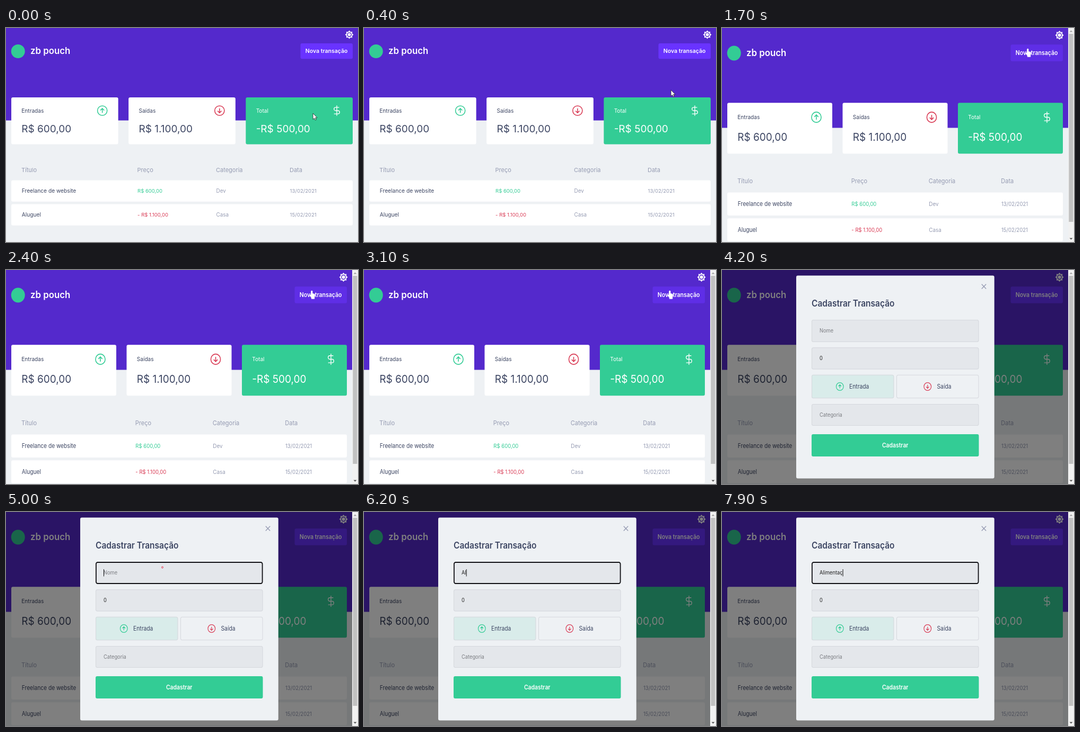
These frames come from a looping animation (664 by 404 pixels, 8 s). An HTML page with a canvas:

```html
<!DOCTYPE html>
<html lang="pt-BR">
<head>
<meta charset="utf-8">
<title>Transações</title>
<style>
html, body { margin: 0; width: 100%; height: 100%; overflow: hidden; background: #eef1f4; }
canvas { display: block; width: 664px; height: 404px; }
</style>
</head>
<body>
<canvas id="stage"></canvas>
<script>
const W = 664, H = 404, LOOP = 8000;
const canvas = document.getElementById('stage');
const ctx = canvas.getContext('2d');
const dpr = window.devicePixelRatio || 1;
canvas.width = W * dpr;
canvas.height = H * dpr;

const PURPLE = '#5429cc', GREEN = '#33cc95', RED = '#d93a54';
const INK = '#3d4663', MUTED = '#969cb3', PAGE = '#eef1f4';
const STRETCH = 1.08; // vertical zoom once the scrollbar is present

const CUT = 1700, OPEN = 3500, CLOSE_ICON = 3600, POINTER_OFF = 4200, FOCUS = 4900;
const KEYS = [[6200, 2], [6400, 3], [6700, 4], [6900, 5], [7000, 6], [7200, 7], [7300, 8], [7900, 9]];
const WORD = 'Alimentaç';

const dollar = new Path2D('M12 1V23M17 5H9.5a3.5 3.5 0 0 0 0 7h5a3.5 3.5 0 0 1 0 7H6');
const arrowCursor = new Path2D('M0 0V11.5L2.6 9.2L4.4 13L6.2 12.2L4.5 8.4H8Z');
const handCursor = new Path2D('M2.4 1C2.4 -.4 4.8 -.4 4.8 1V5.2L8.4 6Q9.8 6.4 9.6 8.2L8.6 12.4V15H3V13L.2 9.4C-.8 8 1 6.8 2 8L2.4 8.4Z');

function rect(x, y, w, h, fill, r = 0) {
  ctx.fillStyle = fill;
  ctx.beginPath();
  ctx.roundRect(x, y, w, h, r);
  ctx.fill();
}

// y is the middle of the capitals
function text(str, x, y, size, color, weight = 400, align = 'left') {
  ctx.font = `${weight} ${size}px Inter, "Open Sans", sans-serif`;
  ctx.textAlign = align;
  ctx.fillStyle = color;
  ctx.fillText(str, x, y + size * 0.36);
}

function disc(x, y, r, fill) {
  ctx.fillStyle = fill;
  ctx.beginPath();
  ctx.arc(x, y, r, 0, Math.PI * 2);
  ctx.fill();
}

function at(x, y, scale, draw) {
  ctx.save();
  ctx.translate(x, y);
  ctx.scale(scale, scale);
  draw();
  ctx.restore();
}

function arrowIcon(x, y, r, color, dir) {
  at(x, y, r / 9, () => {
    ctx.strokeStyle = color;
    ctx.lineWidth = 1.5;
    ctx.beginPath();
    ctx.arc(0, 0, 8.8, 0, Math.PI * 2);
    ctx.moveTo(0, -4 * dir);
    ctx.lineTo(0, 4 * dir);
    ctx.moveTo(-3.6, 0.5 * dir);
    ctx.lineTo(0, 4 * dir);
    ctx.lineTo(3.6, 0.5 * dir);
    ctx.stroke();
  });
}

function dollarIcon(x, y) {
  at(x, y, 0.88, () => {
    ctx.translate(-12, -12);
    ctx.strokeStyle = '#fff';
    ctx.lineWidth = 1.5;
    ctx.stroke(dollar);
  });
}

function sunIcon(x, y) {
  ctx.fillStyle = '#fff';
  ctx.beginPath();
  for (let i = 0; i < 16; i++) {
    const a = i * Math.PI / 8, r = i % 2 ? 5.8 : 8;
    ctx.lineTo(x + r * Math.cos(a), y + r * Math.sin(a));
  }
  ctx.fill();
  disc(x, y, 4.4, PURPLE);
  disc(x, y, 3, '#fff');
}

function card(x, w, label, value, total) {
  const color = total ? '#fff' : INK;
  rect(x, 130.9, w, 88.7, total ? GREEN : '#fff', 3);
  text(label, x + 19.3, 156, 10.1, color);
  text(value, x + 19.3, 190, 19, color);
}

function page(right, hover) {
  rect(0, 0, W, H, PAGE);
  rect(0, 0, W, 174.5, PURPLE);
  sunIcon(right - 6.4, 12.6);

  disc(22.7, 44, 13, GREEN);
  text('zb pouch', 46, 43.4, 16.8, '#fff', 600);
  rect(right - 98.5, 29, 98.5, 29.2, hover ? '#5f2ee6' : '#6933ff', 3);
  text('Nova transação', right - 49.4, 43.7, 10.5, '#fff', 600, 'center');

  const w = (right - 10 - 39) / 3, step = w + 19.5;
  card(10, w, 'Entradas', 'R$ 600,00');
  card(10 + step, w, 'Saídas', 'R$ 1.100,00');
  card(10 + 2 * step, w, 'Total', '-R$ 500,00', true);
  arrowIcon(10 + w - 30, 156, 9.3, GREEN, -1);
  arrowIcon(10 + step + w - 30, 156, 9.3, RED, 1);
  dollarIcon(right - 30, 156);

  const cols = [0, 218.5, 367, 506].map(c => 29 + c * (right - 10) / 644);
  ['Título', 'Preço', 'Categoria', 'Data'].forEach((s, i) => text(s, cols[i], 267.7, 11, MUTED));
  const rows = [
    ['Freelance de website', 'R$ 600,00', 'Dev', '13/02/2021', GREEN],
    ['Aluguel', '- R$ 1.100,00', 'Casa', '15/02/2021', RED]
  ];
  rows.forEach(([name, price, kind, date, color], i) => {
    const y = 287.6 + i * 45;
    rect(10, y, right - 10, 40.2, '#fff', 3);
    text(name, cols[0] + 0.8, y + 20.2, 10.2, INK);
    text(price, cols[1] + 0.6, y + 20.2, 9.5, color);
    text(kind, cols[2] + 0.6, y + 20.2, 9.9, MUTED);
    text(date, cols[3] + 0.6, y + 20.2, 9.6, MUTED);
  });
}

function box(x, y, w, h, fill, stroke = '#d5d8dd', line = 1) {
  rect(x, y, w, h, fill, 3);
  ctx.strokeStyle = stroke;
  ctx.lineWidth = line;
  ctx.beginPath();
  ctx.roundRect(x + line / 2, y + line / 2, w - line, h - line, 3);
  ctx.stroke();
}

function nameField(t) {
  const focused = t >= FOCUS;
  box(169, 87, 315.5, 38.9, '#e4e7eb', focused ? '#101014' : undefined, focused ? 1.8 : 1);
  let typed = '', last = FOCUS;
  for (const [time, n] of KEYS) {
    if (t >= time) {
      typed = WORD.slice(0, n);
      last = time;
    }
  }
  text(typed || 'Nome', 184, 106, 9.3, typed ? '#222' : '#7b7d82');
  if (focused && (t - last) % 1000 < 500) {
    const x = 184 + (typed ? ctx.measureText(typed).width : 0);
    rect(x, 100, 1, 12.6, '#111');
  }
}

function modal(t) {
  rect(140, 9.7, 373.7, 354.6, PAGE, 3);
  if (t >= CLOSE_ICON) {
    ctx.strokeStyle = MUTED;
    ctx.lineWidth = 1.4;
    ctx.beginPath();
    ctx.moveTo(489.8, 24.7);
    ctx.lineTo(498.2, 32.9);
    ctx.moveTo(498.2, 24.7);
    ctx.lineTo(489.8, 32.9);
    ctx.stroke();
  }
  text('Cadastrar Transação', 169, 58, 15.5, INK, 600);
  nameField(t);
  box(169, 135.4, 315.5, 38.2, '#e4e7eb');
  text('0', 184, 154.4, 9.3, '#222');

  box(169, 183, 155.3, 41.4, '#d9ecea');
  box(329, 183, 155.5, 41.4, PAGE);
  arrowIcon(222.3, 203.7, 7, GREEN, -1);
  arrowIcon(387.8, 203.7, 7, RED, 1);
  text('Entrada', 240, 203.7, 10.3, INK);
  text('Saída', 405.5, 203.7, 10.3, INK);

  box(169, 234.2, 315.5, 38, '#e4e7eb');
  text('Categoria', 184, 253.3, 9.3, '#7b7d82');
  rect(169, 287, 315.5, 38.9, GREEN, 3);
  text('Cadastrar', 326.7, 306.3, 10.4, '#fff', 600, 'center');
}

function triangle(x, y, dir, color) {
  ctx.fillStyle = color;
  ctx.beginPath();
  ctx.moveTo(x - 3, y - 1.5 * dir);
  ctx.lineTo(x + 3, y - 1.5 * dir);
  ctx.lineTo(x, y + 1.5 * dir);
  ctx.fill();
}

function scrollbar() {
  rect(653, 0, 11, H, '#f1f1f1');
  rect(654.3, 11, 8.2, 355, '#c1c1c1');
  triangle(658.5, 6, -1, '#a0a0a0');
  triangle(658.5, 398, 1, '#505050');
}

function pointer(path, x, y, outline) {
  at(x, y, 1, () => {
    ctx.lineJoin = 'round';
    ctx.lineWidth = 0.8;
    ctx.fillStyle = '#fff';
    ctx.strokeStyle = outline;
    ctx.fill(path);
    ctx.stroke(path);
  });
}

function clickRing(t) {
  if (t < FOCUS || t >= FOCUS + 200) return;
  ctx.strokeStyle = '#e8304a';
  ctx.lineWidth = 1;
  ctx.beginPath();
  ctx.arc(295, 104.5, 1.5, 0, Math.PI * 2);
  ctx.stroke();
}

function render(t) {
  ctx.setTransform(dpr, 0, 0, dpr, 0, 0);
  if (t < CUT) {
    page(654, false);
    pointer(arrowCursor, 579, t < 400 ? 161 : 117, '#222');
    return;
  }
  ctx.save();
  ctx.scale(1, STRETCH);
  page(643, t < POINTER_OFF);
  if (t >= OPEN) {
    rect(0, 0, W, H, 'rgba(0,0,0,.5)');
    modal(t);
  }
  ctx.restore();
  scrollbar();
  if (t < POINTER_OFF) pointer(handCursor, 573.2, 39.3, '#fff');
  clickRing(t);
}

const start = performance.now();
function tick() {
  render((performance.now() - start) % LOOP);
  requestAnimationFrame(tick);
}
tick();
</script>
</body>
</html>
```
